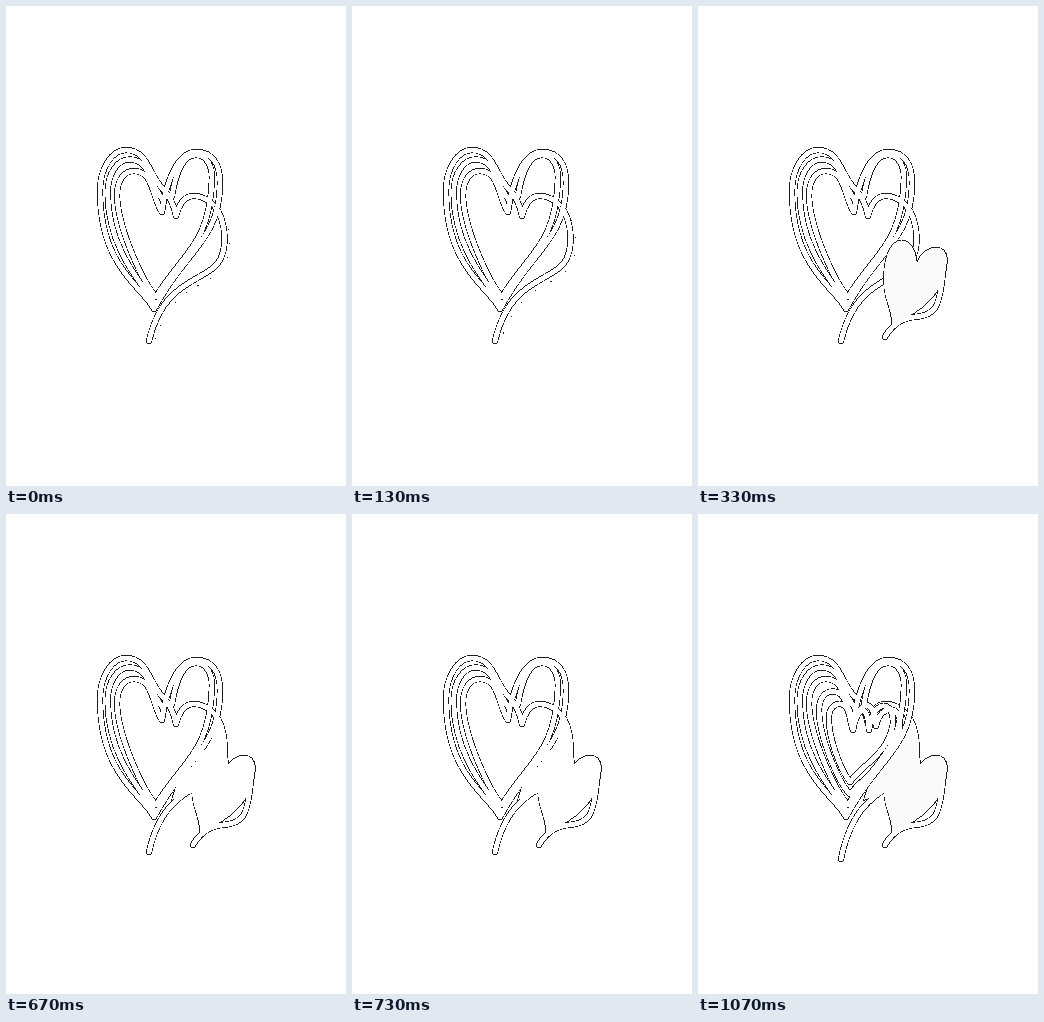
An HTML page that plays this animation: 340x480 px, repeating every 1340 ms.

```html
<!DOCTYPE html>
<html>
<head>
<meta charset="utf-8">
<style>
html, body { margin: 0; width: 100%; height: 100%; overflow: hidden; background: #fff; }
svg { display: block; width: 340px; height: 480px; }
</style>
</head>
<body>
<svg viewBox="0 0 340 480" fill="none" shape-rendering="crispEdges" stroke-linejoin="round" stroke-linecap="round"></svg>
<script>
const svg = document.querySelector('svg');
const INK = '#1c1c1c', PALE = '#fafafa', LOOP = 1340;

const path = (d, attrs) => `<path d="${d}" ${attrs}/>`;

// Curve lying a share u of the way from a to b.
function mix(a, b, u) {
  const to = b.match(/\d+/g);
  let i = 0;
  return a.replace(/\d+/g, v => +v + (to[i++] - v) * u);
}

// Merged silhouette: all ink first, then all fills, leaving only the outer edge.
function merge(ribbons, blobs = [], fill = '#fff') {
  const each = (list, attrs) => list.map(d => path(d, attrs)).join('');
  return each(ribbons, `stroke="${INK}" stroke-width="6.3"`) +
    each(blobs, `stroke="${INK}" stroke-width="1.6"`) +
    each(ribbons, 'stroke="#fff" stroke-width="4.8"') +
    each(blobs, `fill="${fill}"`);
}

// Left side of the big heart, from the tip over the lobe to the dip.
const outer = 'M148 303C138 282 94 262 94 185C94 162 106 144 120 144C142 144 143 170 157 183';
const inner = 'M150 291C136 275 112 222 111 190C111 174 118 165 128 165C148 165 146 192 156 206';
const core = 'M152 268C142 255 130 222 131 203C131 194 137 189 143 190C152 191 151 206 155 216';

// Right side, from the dip to the tip.
const lobe = 'M156 206C160 175 172 146 190 146C208 146 214 160 214 177C214 235 178 245 148 303';
const lobeIn = 'M166 190C170 165 178 149 190 149C202 149 206 162 206 172C204 240 176 247 150 291';
const knot = 'M160 200C166 186 176 188 178 212C182 190 204 190 202 212C198 245 170 258 152 280';
const knotIn = 'M155 216C160 190 170 190 171 216C174 186 196 184 195 210C190 240 165 250 152 268';

const dip = 'M157 183C164 190 168 200 170 210C176 186 190 187 203 195';
const bend = y => `M203 195C219 206 222 235 215 252C203 277 158 270 143 ${y}`;

const heart = 'M194 318C194 300 185 295 186 270C187 225 216 225 219 257C226 238 249 236 249 254C248 285 225 306 194 318Z';
const stem = 'M245 265C242 300 238 310 216 311C200 313 192 322 187 331';
const link = 'M212 204C219 215 221 235 222 250L215 275L186 279L166 286L172 266C190 248 206 235 212 204Z';

const rings = [outer, mix(outer, inner, .45), inner, lobe, lobeIn];
const coreRings = [mix(inner, core, .5), core, knot, knotIn];
const big = [...rings, dip, bend(335)];
const specks = gap => path(bend(335),
  `stroke="${INK}" stroke-linecap="butt" stroke-dasharray="1 ${gap}" transform="translate(5 5)"`);

const poses = [
  [0, merge(big) + specks(13)],
  [70, merge(big) + specks(17)],
  [330, merge(big) + merge([stem], [heart], PALE)],
  [670, merge([...rings, dip, bend(338), stem], [heart, link])],
  [1000, merge([dip, bend(345), stem], [heart, link], PALE) + merge([...rings, ...coreRings])]
];
svg.innerHTML = poses.map(([, art]) => `<g>${art}</g>`).join('');
const groups = [...svg.children];

const start = performance.now();
function tick() {
  const t = (performance.now() - start) % LOOP;
  const current = poses.filter(([from]) => from <= t).length - 1;
  groups.forEach((g, i) => g.setAttribute('display', i === current ? 'inline' : 'none'));
  requestAnimationFrame(tick);
}
tick();
</script>
</body>
</html>
```
